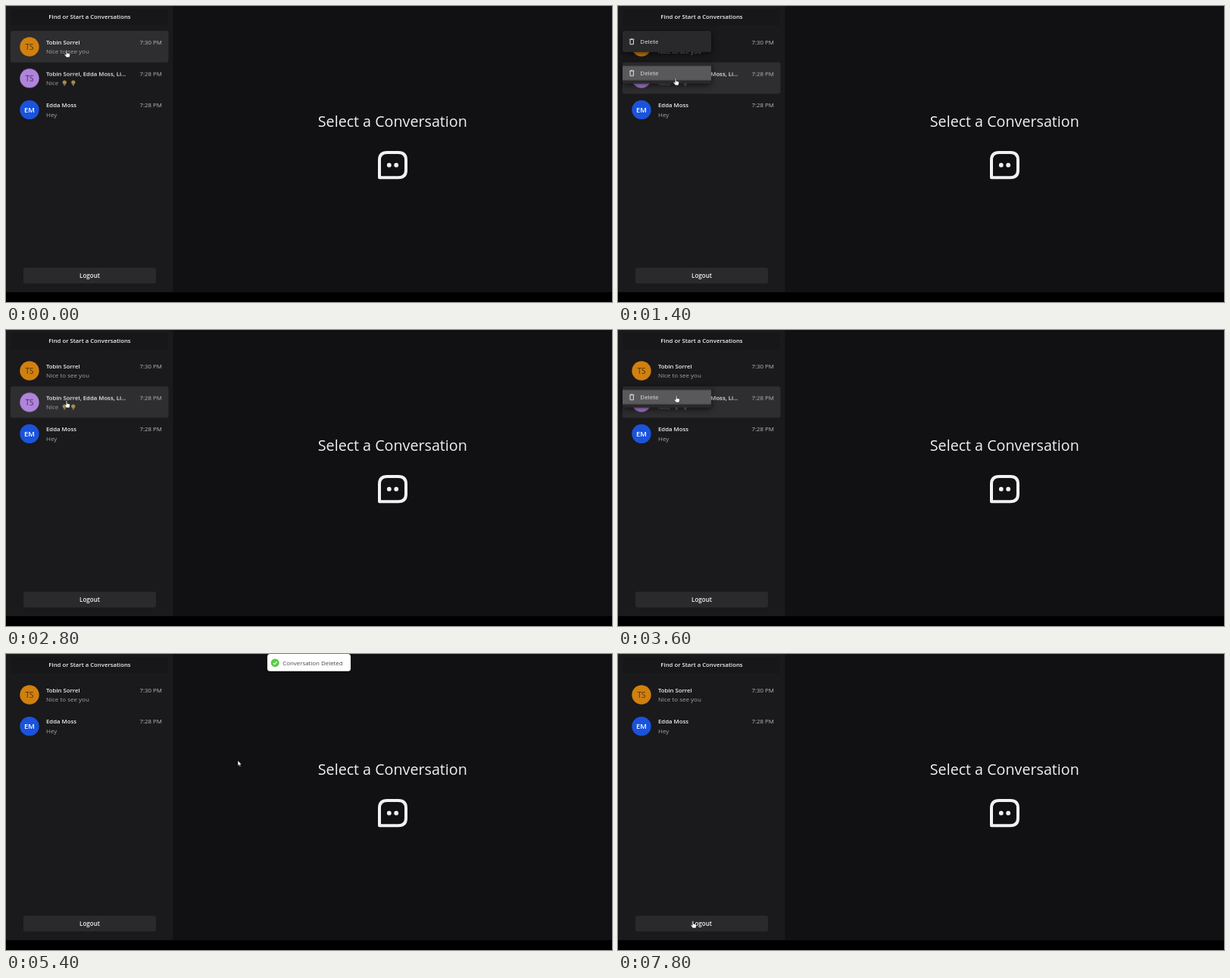
An HTML page for the animation above (8000 ms loop, 800 px wide and 392 px high).

```html
<!DOCTYPE html>
<html lang="en">
<head>
<meta charset="utf-8">
<title>Conversations</title>
<style>
html, body { margin: 0; width: 100%; height: 100%; overflow: hidden; background: #000; }
svg { display: block; width: 100%; height: 100%; font: 8px "Open Sans", "Noto Sans", sans-serif; }
.bold { font-weight: 600; font-size: 7.75px; fill: #f1f1f1; }
.dim { fill: #a3a3a4; }
.time { fill: #b9b9ba; font-size: 7.9px; text-anchor: end; }
.mid { text-anchor: middle; }
.initials { text-anchor: middle; font-size: 10px; }
.hover { fill: #2e2d30; }
.panel { fill: #29292b; filter: drop-shadow(0 2px 4px #000a); }
.toast rect { fill: #fff; filter: drop-shadow(0 1px 2px #0006); }
.toast text { fill: #48484a; font-size: 7.9px; }

/* One loop is 8 s; 2.5% is one 200 ms tick. */
.anim { animation: 8s step-end infinite; }
.hover1 { animation-name: hover1; }
.hover2 { animation-name: hover2; }
.hover3 { animation-name: hover3; }
.menu1 { animation-name: menu1; }
.menu2 { animation-name: menu2; }
.item2 { animation-name: item2; }
.row2 { animation-name: row2; }
.row3 { animation-name: row3; }
.loading { animation-name: loading; }
.done { animation-name: done; }
.cursor { animation-name: move; }
.hand { animation-name: hand; }
.arrow { animation-name: arrow; }
.spin { animation: spin 1s steps(5) infinite; transform-origin: 354px 12px; }

@keyframes hover1 { 0% { opacity: 1 } 10%, 100% { opacity: 0 } }
@keyframes hover2 { 0% { opacity: 0 } 12.5% { opacity: 1 } 22.5% { opacity: 0 } 35% { opacity: 1 } 47.5%, 100% { opacity: 0 } }
@keyframes hover3 { 0% { opacity: 0 } 47.5% { opacity: 1 } 55%, 100% { opacity: 0 } }
@keyframes menu1 { 0% { opacity: 0 } 7.5% { opacity: 1 } 27.5%, 100% { opacity: 0 } }
@keyframes menu2 { 0% { opacity: 0 } 15% { opacity: 1 } 27.5% { opacity: 0 } 40% { opacity: 1 } 47.5%, 100% { opacity: 0 } }
@keyframes item2 { 0% { opacity: 0 } 17.5% { opacity: 1 } 22.5% { opacity: 0 } 42.5% { opacity: 1 } 47.5%, 100% { opacity: 0 } }
@keyframes row2 { 0% { opacity: 1 } 65%, 100% { opacity: 0 } }
@keyframes row3 { 0% { transform: translateY(116.4px) } 65%, 100% { transform: translateY(74.7px) } }
@keyframes loading { 0% { opacity: 0 } 50% { opacity: 1 } 65%, 100% { opacity: 0 } }
@keyframes done { 0% { opacity: 0 } 65% { opacity: 1 } 95%, 100% { opacity: 0 } }
@keyframes hand { 0% { opacity: 1 } 22.5% { opacity: 0 } 32.5% { opacity: 1 } 52.5% { opacity: 0 } 97.5%, 100% { opacity: 1 } }
@keyframes arrow { 0% { opacity: 0 } 22.5% { opacity: 1 } 32.5% { opacity: 0 } 52.5% { opacity: 1 } 97.5%, 100% { opacity: 0 } }
@keyframes move {
  0% { transform: translate(80px, 58px) }
  7.5% { transform: translate(80px, 58px); animation-timing-function: steps(2) }
  12.5% { transform: translate(79px, 92px) }
  17.5% { transform: translate(76px, 95px) }
  22.5% { transform: translate(79px, 178px) }
  25% { transform: translate(79.5px, 204px) }
  30% { transform: translate(79.5px, 180px); animation-timing-function: steps(2) }
  35% { transform: translate(80px, 93px) }
  42.5% { transform: translate(77px, 86px) }
  47.5% { transform: translate(92px, 122px); animation-timing-function: steps(2) }
  52.5% { transform: translate(223px, 129.5px); animation-timing-function: steps(4) }
  62.5% { transform: translate(306px, 141px) }
  90% { transform: translate(306px, 141px); animation-timing-function: steps(3) }
  97.5%, 100% { transform: translate(99px, 353px) }
}
@keyframes spin { to { transform: rotate(360deg) } }
</style>
</head>
<body>
<svg viewBox="0 0 800 392">
  <defs>
    <g id="menu">
      <rect class="panel" x="6" width="117" height="28" rx="3"/>
    </g>
    <g id="delete">
      <path d="M15 11.2h6.4M17 10.6h2.4M16 11.5v6.2h4.4v-6.2" fill="none" stroke="#e6e6e6"/>
      <text x="29.3" y="17.2" fill="#e6e6e6">Delete</text>
    </g>
    <g id="bulb">
      <circle r="2.6" fill="#a8913f"/>
      <path d="M-1.2 2h2.4v2.4h-2.4z" fill="#77705c"/>
    </g>
  </defs>

  <rect width="800" height="379" fill="#111013"/>
  <rect width="220.5" height="379" fill="#1a191b"/>
  <rect x="6" y="4" width="208" height="22" rx="3" fill="#171618"/>
  <text class="bold mid" x="110.5" y="17.4">Find or Start a Conversations</text>

  <g transform="translate(0 33)">
    <rect class="hover anim hover1" x="6" width="208.5" height="41.7" rx="3"/>
    <circle cx="31" cy="21" r="12.7" fill="#d0800f"/>
    <text class="initials" x="31" y="24.8" fill="#49300e">TS</text>
    <text class="bold" x="53" y="17.8">Tobin Sorrel</text>
    <text class="dim" x="53" y="30.4">Nice to see you</text>
    <text class="time" x="206" y="17.8">7:30 PM</text>
  </g>

  <g transform="translate(0 74.7)">
    <g class="anim row2">
      <rect class="hover anim hover2" x="6" width="208.5" height="41.7" rx="3"/>
      <circle cx="31" cy="21" r="12.7" fill="#b184dc"/>
      <text class="initials" x="31" y="24.8" fill="#40285c">TS</text>
      <text class="bold" x="53" y="17.8">Tobin Sorrel, Edda Moss, Li...</text>
      <text class="dim" x="53" y="30.4">Nice</text>
      <use href="#bulb" x="77.3" y="26.3"/>
      <use href="#bulb" x="88.8" y="26.3"/>
      <text class="time" x="206" y="17.8">7:28 PM</text>
    </g>
  </g>

  <g class="anim row3">
    <rect class="hover anim hover3" x="6" width="208.5" height="41.7" rx="3"/>
    <circle cx="31" cy="21" r="12.7" fill="#1a53dc"/>
    <text class="initials" x="31" y="24.8" fill="#fff" style="font-weight:600;font-size:9.4px">EM</text>
    <text class="bold" x="53" y="17.8">Edda Moss</text>
    <text class="dim" x="53" y="30.4">Hey</text>
    <text class="time" x="206" y="17.8">7:28 PM</text>
  </g>

  <g transform="translate(0 33)">
    <g class="anim menu1">
      <use href="#menu"/>
      <use href="#delete"/>
    </g>
  </g>
  <g transform="translate(0 74.7)">
    <g class="anim menu2">
      <use href="#menu"/>
      <rect class="anim item2" x="6" y="4.6" width="117" height="19" fill="#59585a"/>
      <use href="#delete"/>
    </g>
  </g>

  <rect x="23" y="346.5" width="175" height="21" rx="3" fill="#2a292c"/>
  <text class="bold mid" x="110.5" y="360.2" style="font-size:8px">Logout</text>

  <text class="mid" x="510.3" y="160" fill="#f1f1f1" style="font-size:19.7px">Select a Conversation</text>
  <path d="M493 227.2V204q0-10 10-10h15q10 0 10 10v13.2q0 10-10 10z" fill="none" stroke="#f1f1f1" stroke-width="4" stroke-linejoin="round"/>
  <circle cx="505.8" cy="210.7" r="2.9" fill="#f1f1f1"/>
  <circle cx="515.2" cy="210.7" r="2.9" fill="#f1f1f1"/>

  <g class="toast anim loading">
    <rect x="344" width="112.5" height="22.8" rx="3.5"/>
    <circle class="spin" cx="354" cy="12" r="3" fill="none" stroke="#a5a5a8" stroke-width=".9" stroke-dasharray="9 10"/>
    <text x="364.3" y="14.7">Deleting Conversation</text>
  </g>
  <g class="toast anim done">
    <rect x="345" width="110" height="22.8" rx="3.5"/>
    <circle cx="355.2" cy="11.7" r="5.5" fill="#57ce45"/>
    <path d="M352.8 11.8l1.8 1.8 3-3.5" fill="none" stroke="#fff" stroke-width="1.2"/>
    <text x="365.2" y="14.7">Conversation Deleted</text>
  </g>

  <g class="anim cursor" stroke="#111" stroke-width=".6" stroke-linejoin="round" fill="#fff">
    <path class="anim hand" d="M-.8 1q.8-1.6 1.6 0v3.3l3 .7q.9.3.8 1.3l-.7 3.7h-4.2l-2.6-3.6q.1-1.2 1.1-.7l1 .8z"/>
    <path class="anim arrow" d="M0 0v7.2l1.6-1.5 1.1 2.5 1.3-.6-1.1-2.4h2.2z"/>
  </g>
</svg>
</body>
</html>
```
